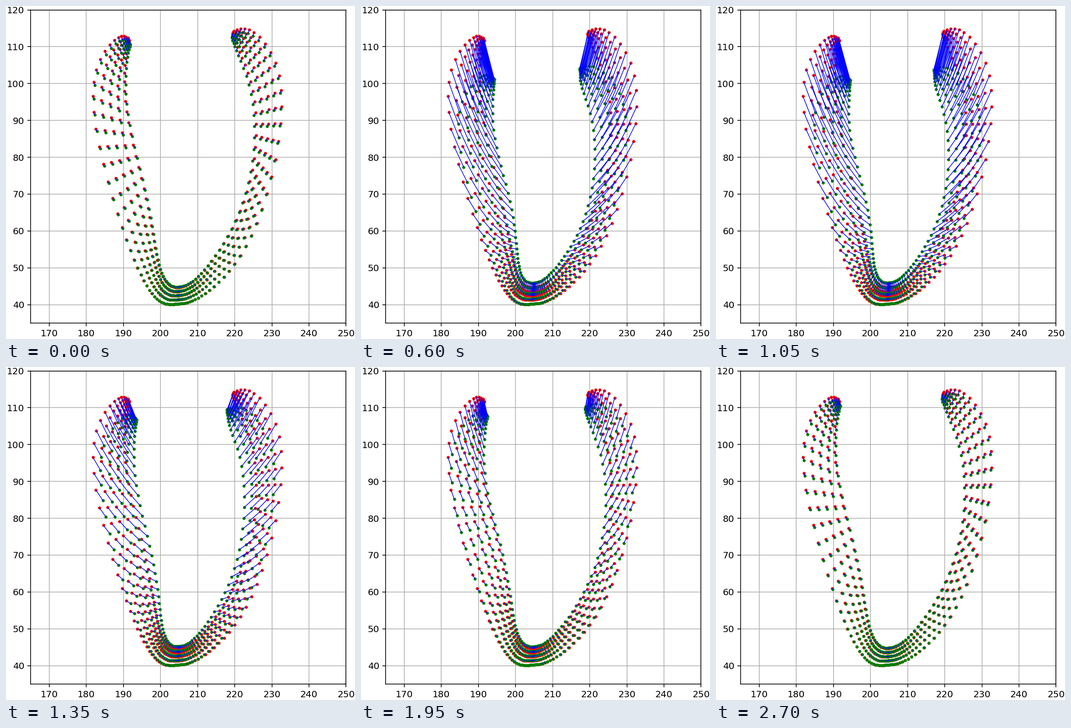
A matplotlib script for the animation above (2850 ms loop, 766x731 px).

```python
import numpy as np
import matplotlib.pyplot as plt
from matplotlib.animation import FuncAnimation
from matplotlib.collections import LineCollection

WIDTH, HEIGHT, DPI = 766, 731, 144
FRAMES, INTERVAL = 19, 150
LAYERS = 5
LEFT, RIGHT, TOP, BOTTOM = 54.2, 746.4, 8.5, 696

# Position along the wall: 0 is the apex, negative is left, positive is right.
# Stations crowd together near the apex.
index = np.arange(-43, 44)
stations = index - 3 * np.tanh(index / 4)

KNOTS = np.array([-40, -35, -30, -22, -12, 0, 12, 22, 30, 35, 40])
OUTER = [(191.2, 112.4), (187.6, 111.8), (182, 100.4), (188.4, 64.7),
         (197.7, 43), (204.5, 40.2), (213.2, 43.9), (227.4, 65.9),
         (232, 102.1), (225.2, 113.9), (219.7, 114.2)]
INNER = [(191.6, 111.6), (190.6, 106.8), (190.5, 95.2), (195.5, 71.5),
         (199.5, 50.7), (205, 44.7), (213.8, 51.8), (224.1, 73.5),
         (224.9, 97.9), (221.3, 108.6), (219.4, 113.4)]


def ease(value, start, end):
    u = np.clip((value - start) / (end - start), 0, 1)
    return u * u * (3 - 2 * u)


def spline(points):
    """Natural cubic spline through the key points, read at the stations."""
    y, h, n = np.array(points), np.diff(KNOTS)[:, None], len(KNOTS)
    system, rhs = np.eye(n), np.zeros_like(y)
    for i in range(1, n - 1):
        before, after = h[i - 1, 0], h[i, 0]
        system[i, i - 1:i + 2] = before, 2 * (before + after), after
        rhs[i] = 6 * ((y[i + 1] - y[i]) / after - (y[i] - y[i - 1]) / before)
    m = np.linalg.solve(system, rhs)
    k = np.clip(np.searchsorted(KNOTS, stations) - 1, 0, n - 2)
    a = (KNOTS[k + 1] - stations)[:, None]
    b = (stations - KNOTS[k])[:, None]
    return ((m[k] * a**3 + m[k + 1] * b**3) / (6 * h[k])
            + (y[k] / h[k] - m[k] * h[k] / 6) * a
            + (y[k + 1] / h[k] - m[k + 1] * h[k] / 6) * b)


def pull(inward, peak, power, lift, drop, start, end):
    """Full contraction of one side: inward swing and downward slide."""
    s = np.abs(stations)
    dx = inward * np.sin(np.pi / 2 * s / peak) ** power
    dy = lift - drop * ease(s, start, end)
    return np.column_stack([dx, dy])


def both_sides(left, right):
    return np.where(stations[:, None] < 0, left, right)


def across(outer, inner):
    """Spread the layers evenly between the two wall surfaces."""
    depth = np.linspace(0, 1, LAYERS)[:, None, None]
    return ((1 - depth) * outer + depth * inner).reshape(-1, 2)


rest = across(spline(OUTER), spline(INNER))
shift = across(
    both_sides(pull(3.0, 32, 3, 0, 10.3, 14, 37),
               pull(-3.2, 32, 3, 0, 10.0, 15, 37)),
    both_sides(pull(3.7, 30, 2, 1.2, 11.5, 8, 40),
               pull(-4.6, 27, 2.5, 1.2, 11.4, 6, 39)))


def contraction(t):
    """Sideways and lengthwise amounts: squeeze, fast release, late release."""
    squeeze = ease(t, 0, 5)
    side = 0.1 + 0.97 * squeeze - 0.75 * ease(t, 6.5, 11.5) - 0.24 * ease(t, 13, 19)
    length = 0.1 + 1.02 * squeeze - 0.73 * ease(t, 6.3, 9.7) - 0.29 * ease(t, 14, 18.5)
    return np.array([side, length])


fig = plt.figure(figsize=(WIDTH / DPI, HEIGHT / DPI), dpi=DPI, facecolor="white")
ax = fig.add_axes([LEFT / WIDTH, 1 - BOTTOM / HEIGHT,
                   (RIGHT - LEFT) / WIDTH, (BOTTOM - TOP) / HEIGHT])
ax.set(xlim=(165, 250), ylim=(35, 120),
       xticks=range(170, 251, 10), yticks=range(40, 121, 10))
ax.grid(True)
ax.set_axisbelow(True)

dot = dict(marker="o", ls="none", ms=3.4, mew=0)
ax.plot(*rest.T, color="red", zorder=2, **dot)
moved, = ax.plot([], [], color="green", zorder=3, **dot)
links = LineCollection([], colors="blue", linewidths=0.75, zorder=4)
links.set_capstyle("projecting")
ax.add_collection(links, autolim=False)


def update(frame):
    now = rest + shift * contraction(frame)
    moved.set_data(*now.T)
    links.set_segments(np.stack([rest, now], axis=1))
    return moved, links


anim = FuncAnimation(fig, update, frames=FRAMES, interval=INTERVAL,
                     repeat=True, repeat_delay=0)
plt.show()
```
